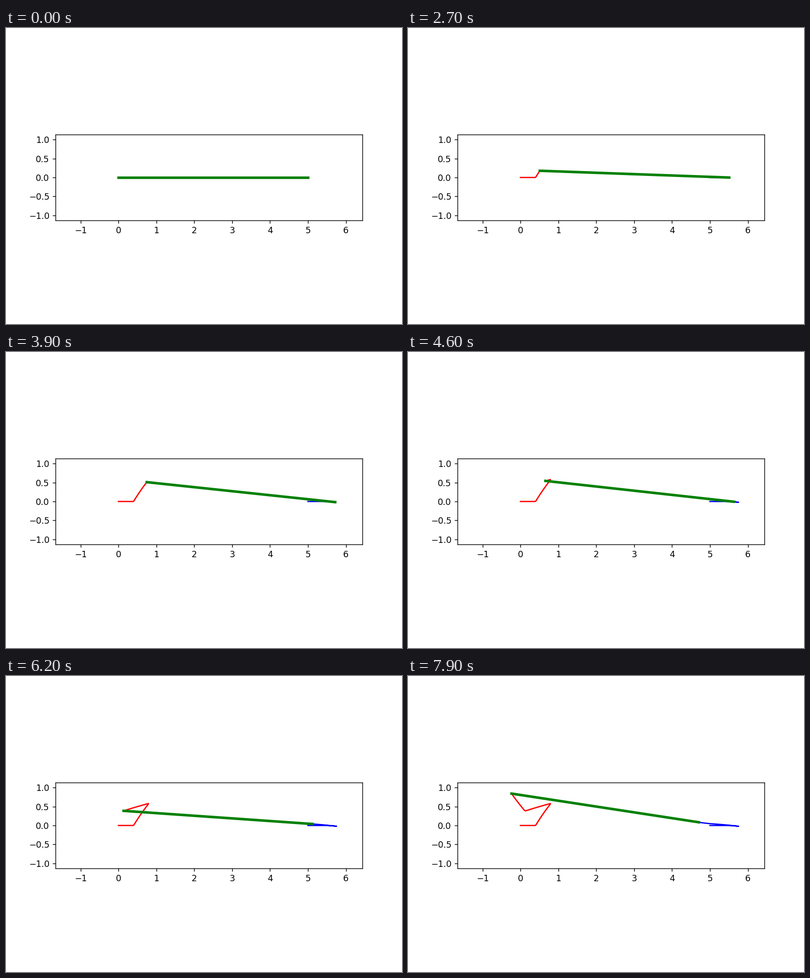
Recreate the animation shown at these times as a matplotlib script. Size 800 px wide and 600 px high, loop 8000 ms.

```python
import numpy as np
import matplotlib.pyplot as plt
from matplotlib.animation import FuncAnimation

FRAMES = 80
LENGTH = 5.0
LEG = 125 / 6  # frames per manoeuvre

# (distance rolled by the rear wheel, change of heading) for each manoeuvre
LEGS = [(0.4, 0.0), (0.367, 0.1215), (-0.66, -0.053), (-0.51, 0.106)]


def roll(x, y, angle, dist, turn, part=1.0):
    """Roll the rear wheel along an arc with constant steering."""
    mid = angle + turn * part / 2
    return (x + dist * part * np.cos(mid),
            y - dist * part * np.sin(mid),
            angle + turn * part)


def pose(i):
    """Rear wheel position and bar angle at step i."""
    state = (LENGTH, 0.0, 0.0)
    full, rest = divmod(i, LEG)
    for leg in LEGS[:int(full)]:
        state = roll(*state, *leg)
    return roll(*state, *LEGS[int(full)], rest / LEG)


rear_x, rear_y, angle = np.array([pose(i) for i in range(FRAMES)]).T
front_x = rear_x - LENGTH * np.cos(angle)
front_y = rear_y + LENGTH * np.sin(angle)

fig, ax = plt.subplots(figsize=(6.4, 4.8), dpi=125)
ax.set_aspect("equal")
ax.set_xlim(-1.66, 6.437)
ax.set_ylim(-1.136, 1.136)
ax.set_xticks(range(-1, 7))
ax.set_yticks([-1.0, -0.5, 0.0, 0.5, 1.0])

front_trail, = ax.plot([], [], color="red", lw=1.5)
rear_trail, = ax.plot([], [], color="blue", lw=1.5)
bar, = ax.plot([], [], color="green", lw=3)


def update(i):
    front_trail.set_data(front_x[:i + 1], front_y[:i + 1])
    rear_trail.set_data(rear_x[:i + 1], rear_y[:i + 1])
    bar.set_data([front_x[i], rear_x[i]], [front_y[i], rear_y[i]])
    return front_trail, rear_trail, bar


anim = FuncAnimation(fig, update, frames=FRAMES, interval=100,
                     repeat=True, repeat_delay=0)
plt.show()
```
